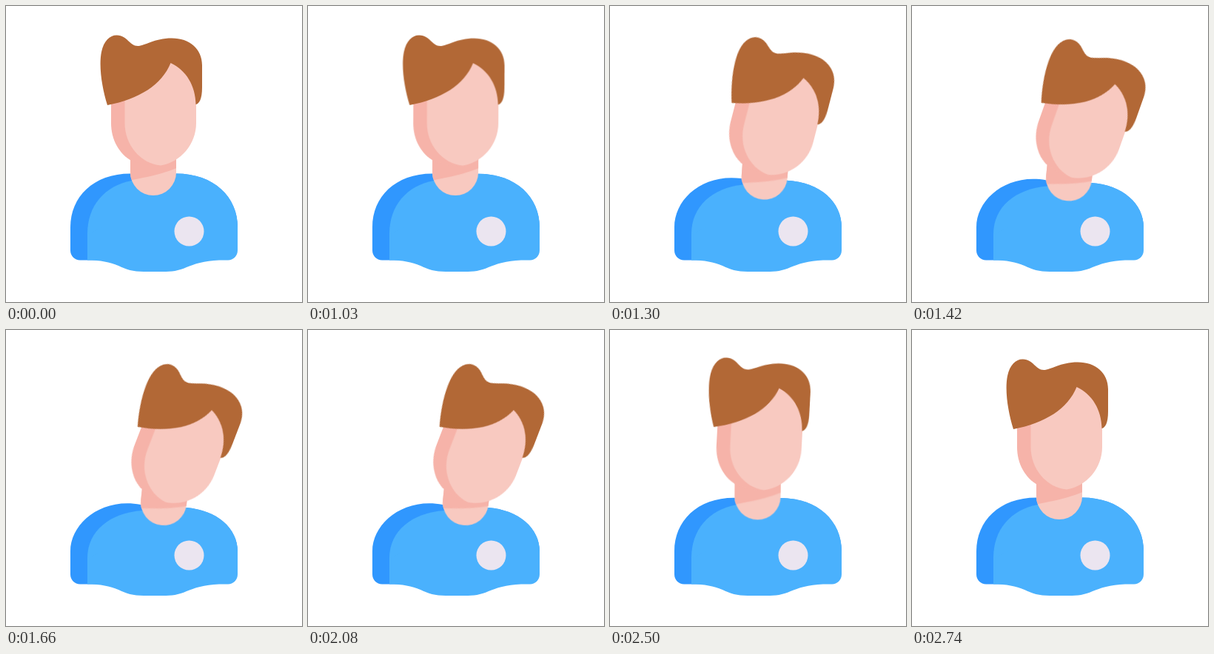
An HTML page for the animation above (2770 ms loop, 400x400 px).

```html
<!DOCTYPE html>
<html lang="en">
<head>
<meta charset="utf-8">
<title>Tilting head</title>
<style>
  html, body { margin: 0; width: 100%; height: 100%; overflow: hidden; background: #fff; }
  svg { display: block; width: 100%; height: 100%; }

  .shirt { fill: #4ab1fd; }
  .sleeve { fill: #3097fe; }
  .skin { fill: #f8c9c0; }
  .shade { fill: #f6b3a9; }
  .hair { fill: #b26836; }
  .badge { fill: #ebe5f0; }

  .lean { animation: lean 2770ms infinite; }
  .tilt { animation: tilt 2770ms infinite; }
  .bend { animation: bend 2770ms infinite; }

  .neck { transform-origin: 199px 226px; --pose: translate(14px, 8px) rotate(6deg); }
  .chin { transform-origin: 199px 229px; --pose: translate(0px, 4px) rotate(6deg); }
  .head { --pose: translate(21.2px, 18.8px); }
  .face { transform-origin: 206px 176px; --pose: rotate(21deg); }

  .sleeve.bend {
    --rest: path("M87 299C87 258 118 226.5 168 226.5L230 226.5C281 226.5 313 258 313 299V303H87Z");
    --bent: path("M87 299C87 262 128 226 182 236L243 240C285 243 313 268 313 299V303H87Z");
  }
  .shirt.bend {
    --rest: path("M110 308C110 270 133 243 170 236L230 226.5C281 226.5 313 258 313 299V312H110Z");
    --bent: path("M110 308C110 272 140 247 184 244L243 240C285 243 313 268 313 299V312H110Z");
  }

  /* The torso and neck return ahead of the head's rotation. */
  @keyframes lean {
    0% { transform: none; }
    36.1% { transform: none; animation-timing-function: cubic-bezier(.333, 0, .5, 1); }
    55.6% { transform: var(--pose); }
    74.37% { transform: var(--pose); animation-timing-function: cubic-bezier(.33, 0, .14, 1); }
    96.03%, 100% { transform: none; }
  }
  @keyframes bend {
    0% { d: var(--rest); }
    36.1% { d: var(--rest); animation-timing-function: cubic-bezier(.333, 0, .5, 1); }
    55.6% { d: var(--bent); }
    74.37% { d: var(--bent); animation-timing-function: cubic-bezier(.33, 0, .14, 1); }
    96.03%, 100% { d: var(--rest); }
  }
  @keyframes tilt {
    0% { transform: none; }
    36.1% { transform: none; animation-timing-function: cubic-bezier(.333, 0, .5, 1); }
    55.6% { transform: var(--pose); }
    74.37% { transform: var(--pose); animation-timing-function: cubic-bezier(.59, 0, .32, 1); }
    98.92%, 100% { transform: none; }
  }
</style>
</head>
<body>
<svg viewBox="0 0 400 400">
  <clipPath id="throat">
    <path d="M168 185H230V225A31 31 0 0 1 168 225Z"/>
  </clipPath>

  <path class="sleeve bend"/>
  <path class="sleeve" d="M87 299H140V343.5H100C93 343.5 87 338 87 330Z"/>
  <path class="shirt bend"/>
  <path class="shirt" d="M110 308L130 299H313V330C313 338 307 343.5 300 343.5H288C268 344 254 349 244 353C233 358 224 359 212 359H186C172 359 162 356 152 351C140 346 128 343.5 110 343.5Z"/>
  <circle class="badge" cx="247.5" cy="304.5" r="20"/>

  <g class="neck lean">
    <path class="skin" d="M168 185H230V225A31 31 0 0 1 168 225Z"/>
    <g clip-path="url(#throat)">
      <path class="shade chin lean" d="M155 180H245V212C226 223 200 230 155 238Z"/>
    </g>
  </g>

  <g class="head lean">
    <g class="face tilt">
      <path class="shade" d="M142 110V158C142 181 153 200 170 209.5C182 214 195 215.5 209 215.5L230 150L200 90Z"/>
      <path class="skin" d="M160.500 118L222 65L262 100L257 130V158C257 187 236 211 209 215.500C182 213 160.500 188 160.500 158Z"/>
      <path class="hair" d="M137 134C130 112 125 82 129 62C132 47 141 39 150 39.500C164 40 167 54 178 54C188 54 200 43.500 224 43.500C248 43.500 265 58 265 80V110C265 126 261 132 256.500 133C256 108 244 87 222.500 77C211 106 180 126 137 134Z"/>
    </g>
  </g>
</svg>
</body>
</html>
```
